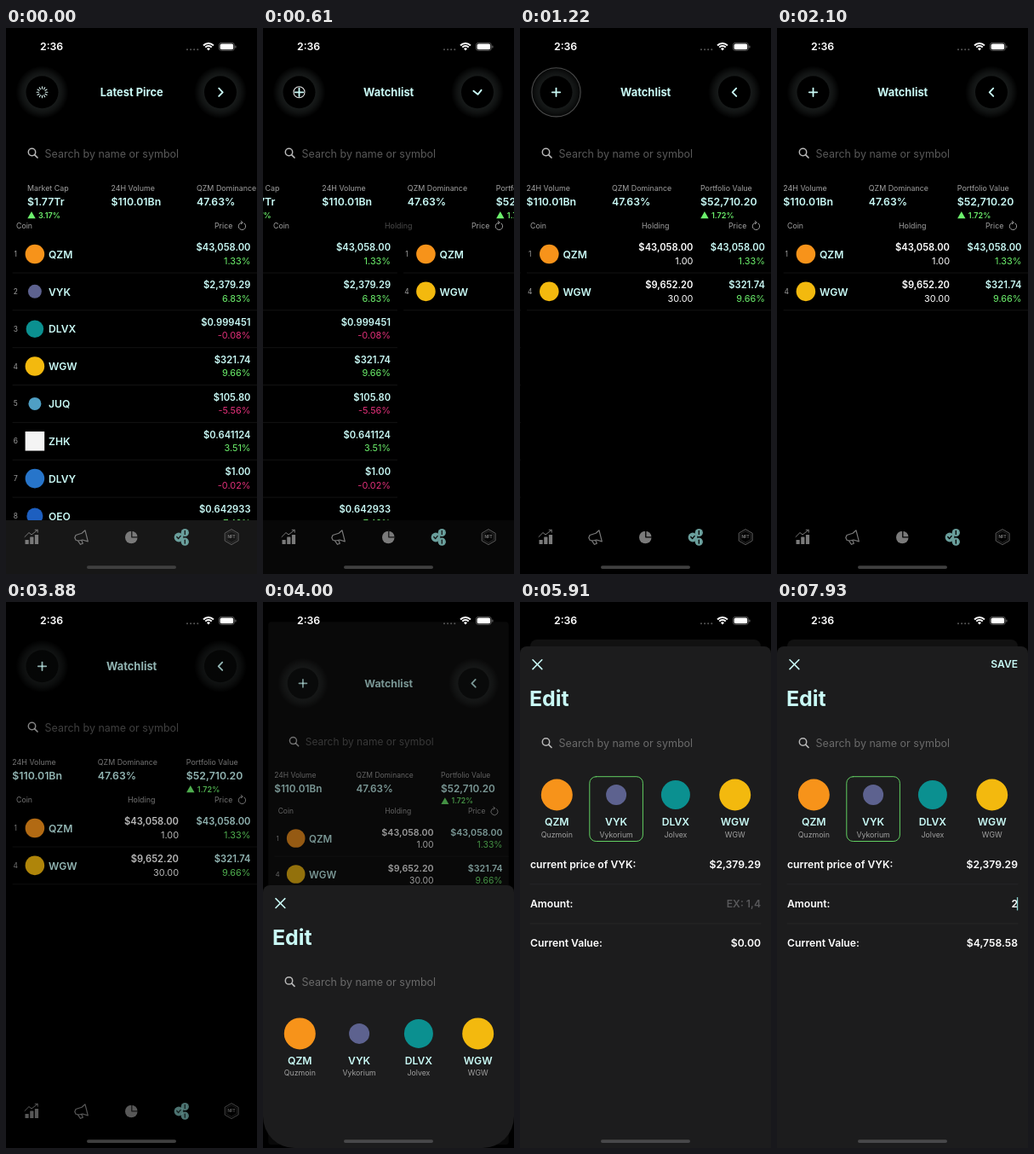
These frames come from a looping animation (295 by 640 pixels, 8000 ms). An HTML page with a canvas:

```html
<!DOCTYPE html>
<html lang="en">
<head>
<meta charset="utf-8">
<title>Coin watchlist</title>
<style>
html, body { margin: 0; width: 100%; height: 100%; overflow: hidden; background: #000; }
canvas { display: block; width: 295px; height: 640px; }
</style>
</head>
<body>
<canvas id="stage"></canvas>
<script>
const W = 295, H = 640, LOOP = 8000;
const canvas = document.getElementById('stage');
const ctx = canvas.getContext('2d');
const ratio = Math.max(1, window.devicePixelRatio || 1);
canvas.width = W * ratio;
canvas.height = H * ratio;

const MINT = '#c9faf6', WHITE = '#fff', GREEN = '#6cf06c', PINK = '#e23079', MUTED = '#a0a0a0';
const ROW = 43.85;

const coins = [
  { id: 'QZM', name: 'Quzmoin', color: '#f7931a', r: 11.3, price: '$43,058.00', change: '1.33%', held: ['$43,058.00', '1.00'] },
  { id: 'VYK', name: 'Vykorium', color: '#5d628f', r: 8, price: '$2,379.29', change: '6.83%' },
  { id: 'DLVX', name: 'Jolvex', color: '#0b9090', r: 10.3, price: '$0.999451', change: '-0.08%' },
  { id: 'WGW', name: 'WGW', color: '#f3b90e', r: 11.3, price: '$321.74', change: '9.66%', held: ['$9,652.20', '30.00'] },
  { id: 'JUQ', color: '#4f9fc4', r: 7.5, price: '$105.80', change: '-5.56%' },
  { id: 'ZHK', color: '#f4f4f4', square: true, r: 11.3, price: '$0.641124', change: '3.51%' },
  { id: 'DLVY', color: '#2775ca', r: 11.3, price: '$1.00', change: '-0.02%' },
  { id: 'OEO', color: '#1d5fc0', r: 9.5, price: '$0.642933', change: '7.42%' }
];
coins.forEach((c, i) => { c.rank = i + 1; });
const held = coins.filter(c => c.held);

const stats = [
  { x: 25, label: 'Market Cap', value: '$1.77Tr', up: '3.17%' },
  { x: 123.5, label: '24H Volume', value: '$110.01Bn' },
  { x: 224, label: 'QZM Dominance', value: '47.63%' },
  { x: 328, label: 'Portfolio Value', value: '$52,710.20', up: '1.72%' }
];

const clamp = v => Math.min(1, Math.max(0, v));
const ramp = (t, from, to) => clamp((t - from) / (to - from));
const easeOut = p => 1 - (1 - p) ** 2;
const spring = (ms, w) => {
  const k = Math.max(0, ms) / 1000 * w;
  return 1 - (1 + k) * Math.exp(-k);
};

// y is the middle of the capital letters
function text(s, x, y, size, color, weight = 400, align = 'left') {
  ctx.font = `${weight} ${size}px Inter, sans-serif`;
  ctx.textAlign = align;
  ctx.fillStyle = color;
  ctx.fillText(s, x, y + size * 0.364);
}

function dot(x, y, r, color) {
  ctx.beginPath();
  ctx.arc(x, y, r, 0, Math.PI * 2);
  ctx.fillStyle = color;
  ctx.fill();
}

function ring(x, y, r, color, width = 1, from = 0, to = Math.PI * 2) {
  ctx.beginPath();
  ctx.arc(x, y, r, from, to);
  ctx.strokeStyle = color;
  ctx.lineWidth = width;
  ctx.stroke();
}

function line(points, color, width = 1, closed = false) {
  ctx.beginPath();
  points.forEach(([x, y], i) => i ? ctx.lineTo(x, y) : ctx.moveTo(x, y));
  if (closed) ctx.closePath();
  ctx.strokeStyle = color;
  ctx.lineWidth = width;
  ctx.lineCap = ctx.lineJoin = 'round';
  ctx.stroke();
}

function box(x, y, w, h, r, color) {
  ctx.beginPath();
  ctx.roundRect(x, y, w, h, r);
  ctx.fillStyle = color;
  ctx.fill();
}

function group(draw, alpha = 1, dx = 0, dy = 0) {
  ctx.save();
  ctx.globalAlpha *= alpha;
  ctx.translate(dx, dy);
  draw();
  ctx.restore();
}

function badge(c, x, y, r) {
  if (c.square) box(x - r, y - r, r * 2, r * 2, 0, c.color);
  else dot(x, y, r, c.color);
}

function search(y, color) {
  ring(30.5, y - 1.5, 4.2, '#b8b8b8', 1.5);
  line([[33.8, y + 1.8], [37, y + 5]], '#b8b8b8', 1.7);
  text('Search by name or symbol', 45.5, y, 12.5, color);
}

function roundButton(x, y) {
  const glow = ctx.createRadialGradient(x, y, 18, x, y, 31);
  glow.addColorStop(0, 'rgba(225,255,250,.11)');
  glow.addColorStop(0.45, 'rgba(225,255,250,.07)');
  glow.addColorStop(1, 'rgba(225,255,250,0)');
  dot(x, y, 31, glow);
  dot(x, y, 19, '#000');
}

function header(t, p) {
  const open = t >= 500;
  roundButton(42.5, 75.3);
  roundButton(252, 75.3);
  if (open) {
    line([[37.8, 75.3], [47.2, 75.3]], MINT, 1.8);
    line([[42.5, 70.6], [42.5, 80]], MINT, 1.8);
    const k = ramp(t, 500, 1500);
    if (k < 1) ring(42.5, 75.3, 31 * easeOut(k), `rgba(255,255,255,${1 - k})`, 1.1);
  } else {
    for (let i = 0; i < 12; i++) {
      const a = i * Math.PI / 6, c = Math.cos(a), s = Math.sin(a);
      line([[42.5 + c * 4, 75.3 + s * 4], [42.5 + c * 6.4, 75.3 + s * 6.4]], '#d8f0ee', 1.1);
    }
  }
  ctx.save();
  ctx.translate(252.2, 75.3);
  ctx.rotate(Math.PI * p);
  line([[-2, -4.6], [2.5, 0], [-2, 4.6]], MINT, 1.9);
  ctx.restore();
  text(open ? 'Watchlist' : 'Latest Pirce', 147.7, 75.5, 12.9, MINT, 700, 'center');
}

function statRow(p) {
  for (const s of stats) {
    const x = s.x - 116.2 * p;
    text(s.label, x, 187.7, 8.9, MUTED);
    text(s.value, x, 203.6, 12.3, MINT, 600);
    if (s.up) {
      ctx.beginPath();
      ctx.moveTo(x + 5, 215);
      ctx.lineTo(x + 9.7, 223.2);
      ctx.lineTo(x + 0.3, 223.2);
      ctx.fillStyle = GREEN;
      ctx.fill();
      text(s.up, x + 13, 219.3, 9.1, GREEN, 600);
    }
  }
}

function columns(p) {
  text('Coin', 12, 231.8, 8.8, MUTED);
  group(() => text('Holding', 143, 231.8, 8.9, MUTED), p);
  text('Price', 245, 231.8, 8.8, MUTED);
  ring(277.5, 232.3, 4.2, MUTED, 1, -0.9, Math.PI * 1.5);
  line([[276.2, 226.3], [278.3, 228.1], [276.2, 229.9]], MUTED, 0.9);
}

function list(items) {
  items.forEach((c, i) => {
    const y = 265 + i * ROW;
    text(c.rank, 11.3, y, 8.4, MUTED, 400, 'center');
    badge(c, 33.9, y, c.r);
    text(c.id, 50, y + 0.3, 12.1, MINT, 600);
    if (items === held) {
      text(c.held[0], 203, y - 7.7, 11.2, WHITE, 600, 'right');
      text(c.held[1], 203, y + 7.7, 10.9, WHITE, 400, 'right');
    }
    text(c.price, 287.5, y - 7.7, 11.2, MINT, 600, 'right');
    text(c.change, 287.5, y + 7.7, 10.9, c.change[0] === '-' ? PINK : GREEN, 400, 'right');
    line([[8, y + 22], [295, y + 22]], '#191919', 0.8);
  });
}

function tabs(p) {
  const grey = '#7a7a7a', teal = '#6a9f9c', back = p > 0.7 ? '#000' : '#171717';
  group(() => box(0, 577, W, 63, 0, '#171717'), 1 - clamp(p * 1.5));

  [[22.5, 5], [28.2, 8.5], [33.9, 11]].forEach(([x, h]) => box(x, 605 - h, 4.2, h, 0.6, grey));
  line([[22, 596.5], [27, 591.5], [30, 594], [37, 588.5]], grey, 1);
  line([[34.2, 588.3], [37.2, 588.3], [37.2, 591.2]], grey, 1);

  line([[85, 593.5], [82, 594.5], [80.8, 597.5], [82.3, 600.5], [85.5, 601], [90, 600], [96.3, 601.8], [93, 588.8], [89, 592.3]], grey, 1.2, true);
  line([[84.5, 601], [87.5, 605.3], [90.3, 604.3], [88.8, 600.5]], grey, 1.2);

  dot(147.3, 597, 7.3, grey);
  line([[147.8, 589], [147.8, 596.8], [155.5, 596.8]], back, 1.3);

  dot(203, 597, 5.4, teal);
  line([[200.8, 596.5], [202.6, 598.6], [205.2, 595.4]], back, 1.3);
  [591.5, 602.2].forEach(y => {
    dot(210.3, y, 4.6, teal);
    line([[210.3, y - 2], [210.3, y + 2]], back, 1.3);
  });

  const hex = r => Array.from({ length: 6 }, (_, i) => {
    const a = (i + 0.5) * Math.PI / 3;
    return [265 + r * Math.cos(a), 596.6 + r * Math.sin(a)];
  });
  line(hex(9), '#5d5d5d', 1, true);
  line(hex(6.8), '#444', 0.6, true);
  text('NFT', 265, 596.7, 4.6, '#8a8a8a', 600, 'center');
}

function page(t) {
  const p = t < 500 ? 0 : t > 1450 ? 1 : spring(t - 480, 12);
  header(t, p);
  search(147, '#585858');
  statRow(p);
  columns(p);
  ctx.save();
  ctx.beginPath();
  ctx.rect(0, 240, W, 337);
  ctx.clip();
  if (p < 1) group(() => list(coins), 1, -W * p);
  if (p > 0) group(() => list(held), 1, W * (1 - p));
  ctx.restore();
  tabs(p);
}

function sheet(t) {
  const rise = t < 4330 ? 588 * (1 - spring(t - 3900, 17.5)) : 0;
  const settle = easeOut(ramp(t, 4900, 5250));
  const typed = t >= 6950;
  const top = 52 + rise + 2 * (1 - settle);
  const corner = Math.min(37 * (1 - settle), H - top);

  box(0, top, W, H - top, [8, 8, corner, corner], '#1c1c1d');
  group(() => {
    line([[15, 67.8], [25.8, 78.6]], MINT, 1.6);
    line([[25.8, 67.8], [15, 78.6]], MINT, 1.6);
    text('Edit', 11, 112.6, 24.9, MINT, 700);
    search(165.5, '#6a6a6a');
    if (typed) text('SAVE', 283, 73, 12.1, MINT, 600, 'right');

    coins.slice(0, 4).forEach((c, i) => {
      const x = 43.3 + 69.8 * i;
      badge(c, x, 226, [18.5, 12, 17, 18.5][i]);
      text(c.id, x, 258, 12.2, MINT, 600, 'center');
      text(c.name, x, 272.3, 8.8, MUTED, 400, 'center');
    });

    group(() => form(t, typed), settle);
  }, 1, 0, top - 52);
}

function form(t, typed) {
  ctx.beginPath();
  ctx.roundRect(81.8, 204.7, 62.6, 75.8, 7.5);
  ctx.strokeStyle = '#62cf62';
  ctx.lineWidth = 1;
  ctx.stroke();

  const row = (label, value, y, color = WHITE) => {
    text(label, 12, y, 12.2, WHITE, 600);
    text(value, 283, y, 12.2, color, 600, 'right');
  };
  row('current price of VYK:', '$2,379.29', 307.7);
  line([[12, 330.8], [283, 330.8]], '#29292a', 0.8);
  row('Amount:', typed ? '2' : 'EX: 1,4', 354, typed ? WHITE : '#58585a');
  line([[12, 377], [283, 377]], '#29292a', 0.8);
  row('Current Value:', typed ? '$4,758.58' : '$0.00', 400);

  const caret = t < 6440 ? 0 : t < 7690 ? 1 - ramp(t, 7390, 7560) : ramp(t, 7750, 7920);
  group(() => box(281.9, 346, 1.3, 15.5, 0.5, '#8fd8d4'), caret);
}

function statusBar() {
  text('2:36', 53.6, 22, 12.3, WHITE, 600, 'center');
  for (let i = 0; i < 4; i++) dot(213 + i * 4.1, 25.2, 1.05, '#555');
  const up = -Math.PI / 2;
  ctx.lineCap = 'butt';
  [8.3, 5.2].forEach(r => ring(238, 26.3, r, WHITE, 2, up - 0.8, up + 0.8));
  ctx.beginPath();
  ctx.moveTo(238, 26.6);
  ctx.arc(238, 26.3, 2.8, up - 0.8, up + 0.8);
  ctx.fillStyle = WHITE;
  ctx.fill();
  ctx.beginPath();
  ctx.roundRect(250.4, 17.4, 18, 9, 2.8);
  ctx.strokeStyle = '#6d6d6d';
  ctx.lineWidth = 0.8;
  ctx.stroke();
  box(251.6, 18.6, 15.6, 6.6, 1.8, WHITE);
  box(269.4, 20.4, 1, 3, 0.5, '#777');
}

function render(t) {
  ctx.setTransform(ratio, 0, 0, ratio, 0, 0);
  ctx.fillStyle = '#000';
  ctx.fillRect(0, 0, W, H);

  const up = t >= 4000;
  if (t < 4330) {
    const k = up ? spring(t - 3900, 17.5) : 0;
    const scale = 1 - 0.08 * k;
    ctx.save();
    ctx.translate(W / 2 * (1 - scale), 44 * k);
    ctx.scale(scale, scale);
    if (up) {
      const g = Math.round(17 * k);
      box(0, 0, W, H, 8 * k, `rgb(${g},${g},${g})`);
    }
    // the page dims at once when the sheet is called
    group(() => page(t), t < 3880 ? 1 : 0.72 - 0.25 * k);
    ctx.restore();
  } else {
    box(12, 44, 271, 60, [8, 8, 0, 0], '#111');
  }
  if (up) sheet(t);

  statusBar();
  box(95, 630.2, 105, 3.8, 1.9, up ? '#48484a' : '#3f3f3f');
}

function tick(now) {
  render(now % LOOP);
  requestAnimationFrame(tick);
}
render(0);
requestAnimationFrame(tick);
</script>
</body>
</html>
```
